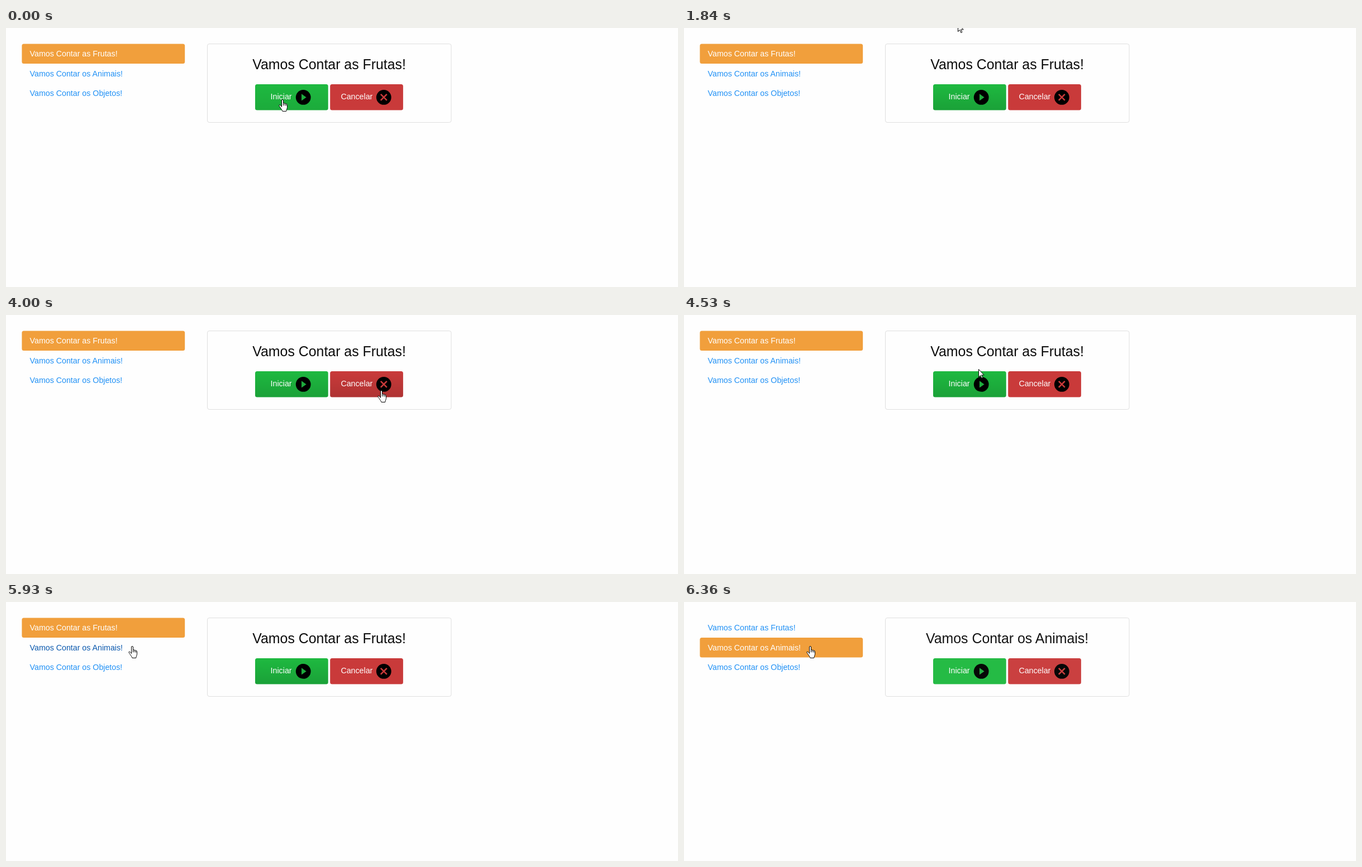
Write an HTML page that moves like this. It is 1203 px wide and 465 px high and loops after 8 s.

```html
<!DOCTYPE html>
<html lang="pt">
<head>
<meta charset="utf-8">
<title>Vamos Contar</title>
<style>
  html, body { margin: 0; height: 100%; overflow: hidden; background: #fefefe; }
  svg { display: block; width: 1203px; height: 465px; }
  text { font: 14.22px "Liberation Sans", Arial, sans-serif; fill: #fff; }
  #title { font-size: 24.89px; fill: #0c0c0c; text-anchor: middle; }
  .cursor { fill: #fff; stroke: #000; stroke-linejoin: round; }
</style>
</head>
<body>
<svg viewBox="0 0 1203 465">
  <defs>
    <linearGradient id="shade" x2="0" y2="1">
      <stop offset="0" stop-opacity="0"/>
      <stop offset="1" stop-opacity=".13"/>
    </linearGradient>
  </defs>

  <rect id="active" x="28.4" width="291.8" height="35.6" rx="3.5" fill="#f19f3c"/>
  <g id="nav">
    <text x="42.6" y="51">Vamos Contar as Frutas!</text>
    <text x="42.6" y="86.5">Vamos Contar os Animais!</text>
    <text x="42.6" y="122">Vamos Contar os Objetos!</text>
  </g>

  <g id="card">
    <rect x="360.5" y="28.5" width="436.5" height="141" rx="3.5" fill="none" stroke="#dfdfdf"/>
    <text id="title" x="578.6" y="74"></text>
    <g>
      <rect x="446" y="101" width="130.7" height="46.6" rx="3.5" fill="#1eb940"/>
      <rect id="greenShade" x="446" y="101" width="130.7" height="46.6" rx="3.5" fill="url(#shade)"/>
      <text x="473.6" y="128">Iniciar</text>
      <circle cx="532.2" cy="124.4" r="13.4"/>
      <path d="M529 118.3v12.2l8.6-6.1z" fill="#1eab3d"/>
    </g>
    <g>
      <rect x="580.2" y="101" width="130.7" height="46.6" rx="3.5" fill="#c93a3a"/>
      <rect id="redShade" x="580.2" y="101" width="130.7" height="46.6" rx="3.5" fill="url(#shade)"/>
      <text x="599.4" y="128">Cancelar</text>
      <circle cx="676.3" cy="124.4" r="13.4"/>
      <path d="M670.8 118.9l11 11m0-11l-11 11" stroke="#c93a3a" stroke-width="2.6"/>
    </g>
  </g>

  <path id="hand" class="cursor" d="M5.5 13.5V2a1.5 1.5 0 0 1 3 0v5.5c0-1 2.6-1 2.6.5 0-1 2.4-.8 2.4.8 .3-.8 2-.6 2 .8v5c0 2-1.5 3.5-1.8 6.9h-6.7c-.5-2-2-3.5-3.5-6C1.5 12.5 .4 11.3 1 10.5c1-1 3 .5 4.5 3M8.5 7.5v3.8M11.1 8v3.3M13.5 8.8v2.8"/>
  <path id="arrow" class="cursor" d="M.5.5v14l3-3 2.4 5 2-1-2.3-4.6h4.6z"/>
  <path id="beam" d="M.5.5h2l1 1 1-1h2M3.5 1.5v11M.5 13.5h2l1-1 1 1h2" fill="none" stroke="#000"/>
</svg>
<script>
const LOOP = 8000;
const $ = id => document.getElementById(id);
const cursors = ["hand", "arrow", "beam"];
const links = [...$("nav").children];

// Each track holds its value until the next time stamp.
const pointer = [
  [0, "hand", 488, 128], [1140, "hand", 485, 129], [1290, "hand", 473, 100],
  [1420, "beam", 452, 56], [1570, "arrow", 454, 12], [1720, "arrow", 490, -8],
  [1850, "arrow", 580, 0], [1970, "arrow", 640, 25], [2120, "beam", 669, 72],
  [2270, "hand", 668, 103], [2400, "hand", 669, 125], [2550, "hand", 670, 131],
  [4000, "hand", 665, 135], [4140, "hand", 650, 138], [4260, "hand", 608, 130],
  [4380, "arrow", 577, 117], [4530, "arrow", 527, 97], [4660, "arrow", 477, 85],
  [4800, "arrow", 406, 77], [4930, "arrow", 337, 68], [5070, "hand", 281, 67],
  [5220, "hand", 250, 72], [5350, "hand", 223, 78], [5510, "hand", 219, 79]
];
const green = [[0, .6], [300, .8], [430, 1], [6090, 0]];
const red = [[0, 0], [2270, .4], [2400, 1], [4260, .5], [4380, 0]];
const fade = [[0, 1], [6090, .55], [6230, .1], [6360, .97]];

const at = (track, t) => track.findLast(step => step[0] <= t).slice(1);

function draw(now) {
  const t = now % LOOP;
  const selected = t < 6090 ? 0 : 1;
  const hovered = t >= 5070 ? 1 : -1;

  $("active").setAttribute("y", 28.4 + 35.55 * selected);
  links.forEach((link, i) => {
    link.style.fill = i === selected ? "#fff" : i === hovered ? "#0a58ad" : "#2191f5";
  });

  $("title").textContent = links[t < 6230 ? 0 : 1].textContent;
  $("card").style.opacity = at(fade, t)[0];
  $("greenShade").style.opacity = at(green, t)[0];
  $("redShade").style.opacity = at(red, t)[0];

  const [kind, x, y] = at(pointer, t);
  for (const id of cursors) $(id).style.display = id === kind ? "" : "none";
  $(kind).setAttribute("transform", `translate(${x} ${y})`);
}

const start = performance.now();
function tick() {
  draw(performance.now() - start);
  requestAnimationFrame(tick);
}
tick();
</script>
</body>
</html>
```
